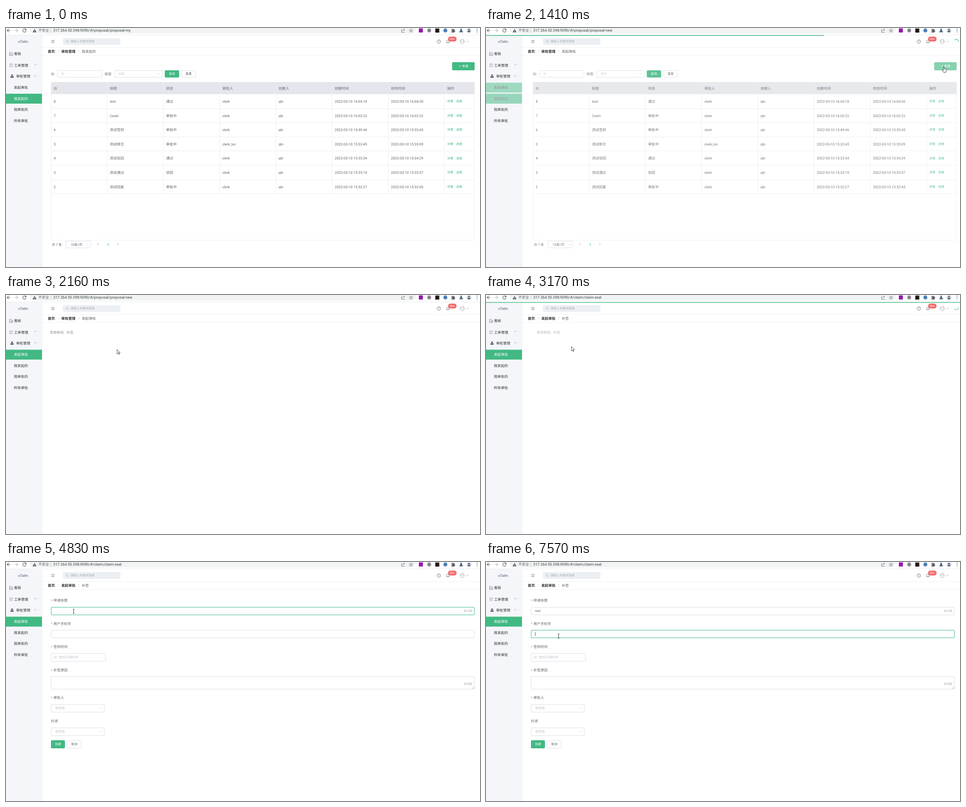
Recreate the animation shown at these times as an HTML page. Size 1054x531 px, loop 8000 ms.

```html
<!DOCTYPE html>
<html lang="zh-CN">
<head>
<meta charset="utf-8">
<title>审批管理</title>
<style>
  html, body { margin: 0; width: 100%; height: 100%; overflow: hidden; background: #fff; }
  svg { display: block; width: 1054px; height: 531px; }
  text { font-family: Roboto, "Noto Sans CJK SC", "Noto Sans CJK", sans-serif; text-rendering: geometricPrecision; white-space: pre; }
</style>
</head>
<body>
<svg id="stage" viewBox="0 0 1054 531" xmlns="http://www.w3.org/2000/svg"></svg>
<script>
const LOOP = 8000;
const GREEN = '#42b983', INK = '#303133', TEXT = '#606266', MUTED = '#909399', FAINT = '#c0c4cc', EDGE = '#dcdfe6', LINE = '#ebeef5';
const BODY = 7.85, SMALL = 6.75, FIELD = 7.3;

// Markup helpers; text is placed by its vertical middle.
const rect = (x, y, w, h, fill, more = '') => `<rect x="${x}" y="${y}" width="${w}" height="${h}" fill="${fill}" ${more}/>`;
const box = (x0, y0, x1, y1, stroke = EDGE, more = '', fill = '#fff') =>
  rect(x0 + .5, y0 + .5, x1 - x0 - 1, y1 - y0 - 1, fill, `stroke="${stroke}" rx="1.5" ${more}`);
const text = (x, y, str, size = BODY, fill = TEXT, more = '') =>
  `<text x="${x}" y="${(y + size * .36).toFixed(2)}" font-size="${size}" fill="${fill}" ${more}>${str}</text>`;
const path = (d, stroke = MUTED, width = .8, more = '') => `<path d="${d}" fill="none" stroke="${stroke}" stroke-width="${width}" ${more}/>`;
const circle = (x, y, r, fill, more = '') => `<circle cx="${x}" cy="${y}" r="${r}" fill="${fill}" ${more}/>`;
const ring = (x, y, r, stroke, width = .8) => circle(x, y, r, 'none', `stroke="${stroke}" stroke-width="${width}"`);
const group = (id, body, more = '') => `<g id="${id}" ${more}>${body}</g>`;
const chevron = (x, y, dir, color = FAINT, s = 2.6) => path({
  down: `M${x - s} ${y - s / 2}l${s} ${s} ${s} ${-s}`, up: `M${x - s} ${y + s / 2}l${s} ${-s} ${s} ${s}`,
  right: `M${x - s / 2} ${y - s}l${s} ${s} ${-s} ${s}`, left: `M${x + s / 2} ${y - s}l${-s} ${s} ${s} ${s}`
}[dir], color);
const BOLD = 'font-weight="700"', MID = 'text-anchor="middle"', END = 'text-anchor="end"';

function browserBar() {
  const gray = '#5f6368';
  return rect(0, 0, 1054, 15, '#fff') + rect(52, -8, 859, 20.5, '#f1f3f4', 'rx="9"') +
    path('M10 5.5H2.5M6 2L2.5 5.5 6 9', gray, 1.2) + path('M19 5.5h7.5M23 2l3.5 3.5L23 9', '#babcbe', 1.2) +
    path('M44 3.3A3.7 3.7 0 1 0 44.7 6.5M44.8 1.5v2.8H42', gray, 1.2) +
    '<path d="M63.5 1.8l4.4 7.6h-8.8z" fill="#5f6368"/>' + path('M63.5 4.3v2.3M63.5 7.4v1', '#f1f3f4', .9) +
    text(72, 5.5, '不安全', BODY, gray) + rect(99.5, 1.5, .8, 9, '#b5b8bc') +
    text(105, 5.5, '', 8.3, '#3c4043', 'id="address"') +
    path('M881 4h-1.500v5.500h6V8M881.500 6.500q.5-3 4-3M884 1.500l2.500 2-2.500 2', gray) +
    path('M900.500 1.800l1.100 2.600 2.800.2-2.200 1.800.8 2.800-2.500-1.500-2.500 1.500.8-2.800-2.200-1.800 2.800-.2z', gray) +
    rect(918, 1, 9, 9, '#9418b0') + circle(941, 5.5, 4.4, '#85888b') + rect(954.5, 1.2, 9, 9, '#1c1c1c') +
    circle(977, 5.5, 4.4, '#4a7fb5') +
    '<path d="M990.500 3h2a1.500 1.500 0 0 1 3 0h2v2.500a1.400 1.400 0 0 1 0 2.800V10h-7V7.800a1.300 1.300 0 0 0 0-2.600z" fill="#5f6368"/>' +
    '<path d="M1010.500 1.500h3.200v3l2.800 5h-8.800l2.800-5z" fill="#4d6480"/>' +
    circle(1029.5, 5.5, 5.2, '#d3dbe6') + circle(1029.5, 3.8, 1.9, '#4d5f78') + rect(1026, 6.4, 7, 2.8, '#4d5f78', 'rx="1.4"') +
    [2.2, 5.5, 8.8].map(y => circle(1047.5, y, .9, gray)).join('');
}

const MENU = ['发起审批', '我发起的', '我审批的', '所有审批'];
function sidebar() {
  const items = MENU.map((label, i) => {
    const y = 132.5 + i * 24.5;
    return rect(0, y - 11, 80, 22, GREEN, `id="active${i}" opacity="0"`) + text(17.5, y, label, BODY, INK, `id="menu${i}"`);
  });
  return rect(0, 15.5, 81.5, 516, '#f4f6f9') + text(38, 30.5, 'oTalm', 8, '#4d5b70', MID) +
    path('M15 57v4H8v-7h4M9.500 59l2-2 1.500 1.200 2.500-3.700', TEXT) + text(18, 57.5, '看板', BODY, INK) +
    path('M8.500 79.500h5.500v6.500H8.500zM10 81.500h2.500M10 83.500h2.500', MUTED, .7) + text(18, 83, '工单管理', BODY, INK) + chevron(65.5, 81, 'down', MUTED) +
    circle(13.5, 105, 2, TEXT) + rect(9.8, 107.2, 7.4, 3.4, TEXT, 'rx="1.2"') + text(22.5, 107.3, '审批管理', BODY, INK) + chevron(65.5, 106, 'up', MUTED) +
    items.join('');
}

function header() {
  return rect(82, 43, 972, .8, '#eceef2') + rect(82, 60.5, 972, .8, '#eceef2') +
    path('M101 27.500h6.500M104 30h3.500M101 32.500h6.500M102.500 29l-1.500 1 1.500 1', TEXT) +
    rect(126.5, 22.5, 128, 15, '#eceff3', 'rx="1"') + ring(136, 29.5, 2.3, '#a8adb6', .7) + path('M137.700 31.200l1.600 1.600', '#a8adb6', .7) +
    text(143, 30, '请输入关键字搜索', SMALL, '#a9aeb7') +
    ring(962.5, 30, 3.9, TEXT) + text(962.5, 30.1, '?', 6, TEXT, MID) +
    path('M979 32.500h7M980 32.500v-3a2.500 2.500 0 0 1 5 0v3M982 33.700h1', TEXT) +
    rect(983, 19, 19, 11, '#f56c6c', 'rx="5.5"') + text(992.5, 24.6, '99+', 6.7, '#fff', MID) +
    circle(1014.5, 30, 5.6, '#d3d6dc') + circle(1014.5, 28.3, 1.8, '#fff') + rect(1011.4, 30.8, 6.2, 2.6, '#fff', 'rx="1.300"') +
    chevron(1026.5, 30, 'down', MUTED) +
    text(93, 52, '首页', BODY, INK, BOLD) + chevron(116.5, 52, 'right') +
    text(123, 52, '', BODY, INK, `${BOLD} id="crumbParent"`) + chevron(162, 52, 'right') + text(168.5, 52, '', BODY, TEXT, 'id="crumbLeaf"');
}

function button(x0, y0, x1, y1, label, primary, id = '') {
  return box(x0, y0, x1, y1, primary ? GREEN : EDGE, id && `id="${id}"`, primary ? GREEN : '#fff') +
    text((x0 + x1) / 2, (y0 + y1) / 2, label, SMALL, primary ? '#fff' : TEXT, `${MID} font-weight="500"`);
}

function listView() {
  const columns = ['ID', '标题', '状态', '审批人', '创建人', '创建时间', '修改时间', '操作'];
  const rows = [
    '8|test|通过|clerk|qln|16:04:18|16:04:30', '7|Ceshi|审批中|clerk|qln|16:02:22|16:02:22',
    '6|测试签到|审批中|clerk|qln|15:49:46|15:55:45', '5|测试移交|审批中|clerk_tor|qln|15:33:45|15:35:09',
    '4|测试驳回|通过|clerk|qln|15:33:34|15:34:29', '3|测试通过|驳回|clerk|qln|15:33:19|15:33:57',
    '2|测试回复|审批中|clerk|qln|15:32:27|15:32:45'
  ];
  const colX = i => 100 + i * 125, rowY = i => 147 + i * 31.6;
  let out = text(100, 102, 'ID') + box(114, 94, 214, 110) + text(123, 102, 'ID', SMALL, FAINT) +
    text(219, 102, '状态') + box(241, 94, 349, 110) + text(250, 102, '状态', SMALL, FAINT) + chevron(338.5, 102, 'down') +
    button(353, 94, 385, 110, '查询', true) + button(390, 94, 422, 110, '重置') +
    button(992, 76, 1042, 94, '＋ 新建', true, 'create') +
    box(100, 120, 1042, 472, LINE, 'rx="0"') + rect(100, 120, 942, 27, '#e4e6eb');
  columns.forEach((label, i) => {
    out += text(colX(i) + 6, 134, label, BODY, MUTED, BOLD);
    if (i) out += rect(colX(i) - .5, 120, 1, 248, LINE);
  });
  rows.forEach((row, r) => {
    const y = rowY(r) + 16.2;
    row.split('|').forEach((cell, c) => { out += text(colX(c) + 6, y, c > 4 ? '2022-03-10 ' + cell : cell); });
    out += text(981, y - .5, '详情', SMALL, GREEN) + text(1001, y - .5, '进度', SMALL, GREEN) +
      rect(100, Math.round(rowY(r + 1)) - .5, 942, 1, LINE);
  });
  return out + text(102, 481, '共 7 条', FIELD) + box(133, 473, 189, 489) + text(144, 481, '10条/页', FIELD) + chevron(182, 481, 'down', FAINT, 2) +
    chevron(205, 480.5, 'left', MUTED) + text(227, 481, '1', FIELD, GREEN, `${BOLD} ${MID}`) + chevron(248.5, 480.5, 'right', MUTED);
}

const pickView = () => text(100, 82.7, '常用审批', BODY, '#85888d') + text(137, 82.7, '补签', BODY, '#85888d');

function formView() {
  const label = (y, str) => text(100, y + .8, '*', BODY, '#f56c6c') + text(105.5, y, str);
  const select = y => box(100, y, 219, y + 18) + text(109, y + 8.7, '请选择', FIELD, FAINT) + chevron(209.5, y + 8.7, 'down');
  return label(85, '申请标题') + box(100, 100, 1042, 118, EDGE, 'id="titleBox"') + text(109, 108.8, '', FIELD, TEXT, 'id="titleText"') +
    text(1036.5, 109, '', SMALL, MUTED, `${END} id="counter"`) +
    label(136.7, '用户手机号') + box(100, 151, 1042, 169, EDGE, 'id="phoneBox"') +
    label(188, '签到时间') + box(100, 203, 222, 221) + ring(109.5, 211.7, 2.9, FAINT, .7) + path('M109.500 210v2h1.500', FAINT, .7) + text(117, 211.7, '选择日期时间', FIELD, FAINT) +
    label(240, '补签原因') + box(100, 254, 1042, 283) + text(1036.5, 271, '0/200', SMALL, MUTED, END) + path('M1036.500 281.500l4.500-4.500M1039 281.500l2-2', MUTED, .7) +
    label(301.5, '审批人') + select(316) + text(100, 353, '抄送') + select(368) +
    button(100, 396, 131, 414, '创建', true) + button(136, 396, 168, 414, '取消') +
    rect(109, 104.5, .8, 8.5, INK, 'id="caret"');
}

const pointer = '<path d="M0 0v9.800l2.300-2.100 1.500 3.400 1.600-.7-1.500-3.300h3.100z" fill="#fff" stroke="#222" stroke-width=".8"/>';
const hand = '<path d="M-1 .8q1-1.300 1.900 0v3.800l3.700.9q1.200.4 1 1.700l-.8 5.300h-5.300l-3.200-4.300q.6-1.300 2.700.3z" fill="#fff" stroke="#222" stroke-width=".8"/>';
const beam = path('M-1.800-4.800H-.4L0-4.400.4-4.800H1.800M0-4.400V4.400M-1.800 4.800H-.4L0 4.400.4 4.800H1.800', '#222', .9);

document.getElementById('stage').innerHTML = rect(0, 0, 1054, 531, '#fff') +
  group('list', listView()) + group('pick', pickView()) + group('form', formView()) +
  header() + sidebar() + browserBar() + rect(0, 15, 1054, .8, '#e6e8eb') +
  group('loader', rect(0, 15.8, 0, 1.5, GREEN, 'id="bar"') + path('M1042.800 32.200A4.600 4.600 0 0 1 1049.200 25.800', GREEN, 1.1, 'id="spinner"')) +
  group('pointer', pointer) + group('hand', hand) + group('beam', beam);

const el = {};
document.querySelectorAll('[id]').forEach(node => { el[node.id] = node; });
const set = (id, attrs) => { for (const k in attrs) el[id].setAttribute(k, attrs[k]); };
const say = (id, str) => { if (el[id].textContent !== str) el[id].textContent = str; };

const clamp = v => Math.max(0, Math.min(1, v));
const ramp = (t, from, to) => clamp((t - from) / (to - from));
const mix = (a, b, p) => 'rgb(' + [1, 3, 5].map(i => {
  const u = parseInt(a.slice(i, i + 2), 16), v = parseInt(b.slice(i, i + 2), 16);
  return Math.round(u + (v - u) * p);
}) + ')';

// The CSS "ease" curve, cubic-bezier(.25, .1, .25, 1).
function ease(x) {
  let lo = 0, hi = 1;
  for (let i = 0; i < 18; i++) {
    const s = (lo + hi) / 2, n = 1 - s;
    if (.75 * n * n * s + .75 * n * s * s + s * s * s < x) lo = s; else hi = s;
  }
  const n = 1 - lo;
  return .3 * n * n * lo + 3 * n * lo * lo + lo * lo * lo;
}

const ROUTES = [
  { at: 0, url: 'my', parent: '审批管理', leaf: '我发起的' },
  { at: 1340, url: 'new', parent: '审批管理', leaf: '发起审批' },
  { at: 3040, url: '', parent: '发起审批', leaf: '补签' }
];
const KEYS = [4300, 5230, 5300, 5500, 5630, 6580];
const TRACK = [
  [70, 1046, 522], [400, 834, 346], [540, 834, 346], [1180, 1016, 92], [1300, 1018, 86], [1480, 1018, 86],
  [2160, 247, 121], [2240, 247, 121], [2800, 141, 84], [3030, 141, 84], [3170, 190, 114.5], [3270, 190, 114.5],
  [3760, 150, 104], [3960, 150, 104], [4090, 150.5, 109.5], [6420, 150.5, 109.5], [6560, 161.5, 164.5]
];

// Views slide in from the left and out to the right while fading.
function slide(id, t, enter, enterTime, leave, leaveTime) {
  const inP = ease(ramp(t, enter, enter + enterTime)), outP = ease(ramp(t, leave, leave + 500));
  const shown = t >= enter && t < leave + leaveTime;
  set(id, { display: shown ? 'inline' : 'none', opacity: inP * (1 - outP), transform: `translate(${30 * (inP - 1 + outP)} 0)` });
}

function moveCursor(t) {
  let i = TRACK.findIndex(k => k[0] > t);
  if (i < 0) i = TRACK.length;
  const a = TRACK[Math.max(0, i - 1)], b = TRACK[Math.min(i, TRACK.length - 1)];
  const p = a === b ? 0 : ramp(t, a[0], b[0]), s = p * p * (3 - 2 * p);
  const kind = t < 70 ? '' : t > 3640 ? 'beam' : (t > 1160 && t < 1540) || (t > 2720 && t < 3060) ? 'hand' : 'pointer';
  for (const id of ['pointer', 'hand', 'beam']) {
    set(id, { display: id === kind ? 'inline' : 'none', transform: `translate(${a[1] + (b[1] - a[1]) * s} ${a[2] + (b[2] - a[2]) * s})` });
  }
}

function render(t) {
  const route = ROUTES.filter(r => r.at <= t).pop();
  say('address', '317.264.50.398:9090/#/' + (route.url ? 'proposal/proposal-' + route.url : 'claim/claim-seal'));
  say('crumbParent', route.parent);
  say('crumbLeaf', route.leaf);

  const swap = ease(ramp(t, 1340, 1590));
  [swap, 1 - swap].forEach((p, i) => {
    set('active' + i, { opacity: p });
    set('menu' + i, { fill: mix(INK, '#ffffff', p), 'font-weight': p > .5 ? 500 : 400 });
  });

  slide('list', t, -1000, 500, 1345, 500);
  slide('pick', t, 1845, 500, 3045, 385);
  slide('form', t, 3430, 560, LOOP, 500);
  const hover = mix(GREEN, '#71c9a0', ramp(t, 1130, 1230));
  set('create', { fill: hover, stroke: hover });

  const since = t - route.at;
  const loading = route.at > 0 && since < 350;
  set('loader', { display: loading ? 'inline' : 'none', opacity: 1 - ramp(since, 110, 340) });
  set('bar', { width: 1054 * (.708 * ramp(since, -20, 70) + .292 * ramp(since, 70, 130)) });
  set('spinner', { transform: `rotate(${.9 * (t - 1340)} 1046 29)` });

  const typed = KEYS.slice(1, 5).filter(k => k <= t).length;
  say('titleText', 'test'.slice(0, typed));
  say('counter', typed + '/120');
  const next = ramp(t, 6540, 6690), focus = ramp(t, 4270, 4420) * (1 - next);
  set('titleBox', { stroke: mix(t > 3700 && t < 4420 ? FAINT : EDGE, GREEN, focus) });
  set('phoneBox', { stroke: mix(EDGE, GREEN, next) });

  const last = KEYS.filter(k => k <= t).pop();
  const onPhone = t >= KEYS[5];
  const blink = last && (t - last) % 990 < 530;
  const width = typed && !onPhone ? el.titleText.getComputedTextLength() : 0;
  set('caret', { opacity: blink ? 1 : 0, x: 109 + width, y: onPhone ? 156 : 104.5 });

  moveCursor(t);
}

const start = performance.now();
function frame() {
  render((performance.now() - start) % LOOP);
  requestAnimationFrame(frame);
}
frame();
</script>
</body>
</html>
```
